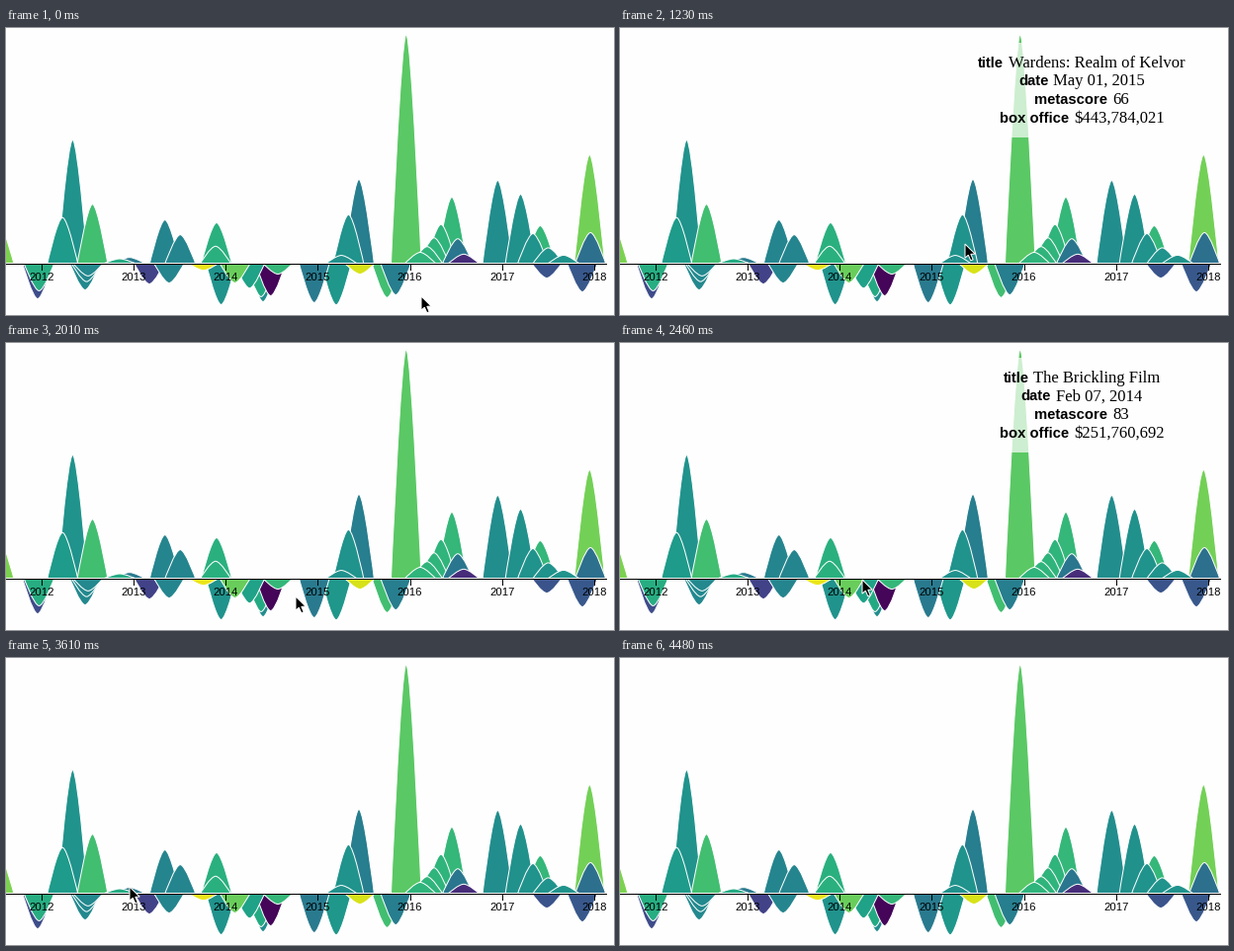
A matplotlib script for the animation above (5910 ms loop, 615x291 px).

```python
import numpy as np
import matplotlib.pyplot as plt
from matplotlib.animation import FuncAnimation
from matplotlib.patches import PathPatch, Polygon, Rectangle
from matplotlib.path import Path

W, H, DPI = 615, 291, 100
TICK, LOOP = 30, 5910
PX = 72 / DPI
BASE = 238.5
YEAR, YEAR_X = 93.1, 36.1          # pixels per year, x of 2012
HALF = YEAR * 60 / 365             # every peak spans 60 days each way
PAR, PX_PER_M = 307, .36           # takings on the axis line, pixels per million
MID, TOP, LEAD = 467, 15, 18.7
MONTHS = "Jan Feb Mar Apr May Jun Jul Aug Sep Oct Nov Dec".split()

# title, date, score, takings: these drive both peaks and tooltips
FILMS = [
    ("The Tall Lantern Affair:\nNorthern Protocol", "Dec 21, 2011", 73, 229_397_903),
    ("The Amber Gauntlet", "Mar 23, 2012", 68, 435_570_888),
    ("The Umbral Sentry", "Jul 20, 2012", 78, 473_139_099),
    ("Galaxy Reach: Into Shadow", "May 03, 2013", 62, 429_013_994),
    ("Unbearable Us 2", "Jul 03, 2013", 62, 387_266_004),
    ("Weightless", "Oct 04, 2013", 96, 287_092_705),
    ("The Marshfolk Saga", "Dec 13, 2013", 66, 190_366_855),
    ("The Brickling Film", "Feb 07, 2014", 83, 251_760_692),
    ("Commodore Meridia: The\nSummer Courier", "Apr 04, 2014", 70, 236_733_225),
    ("Mechanoids: Epoch of Ruin", "Jun 27, 2014", 33, 215_439_076),
    ("The Tarnholt: March of the\nNine Banners", "Dec 17, 2014", 59, 196_119_788),
    ("Thornabell", "Mar 13, 2015", 67, 189_594_626),
    ("Torque Republic", "Apr 03, 2015", 65, 329_007_020),
    ("Wardens: Realm of Kelvor", "May 01, 2015", 66, 443_784_021),
    ("Primal Valley", "Jun 12, 2015", 60, 543_270_625),
    ("Red Dust Alone", "Oct 02, 2015", 78, 210_433_663),
    ("Nightglass", "Nov 06, 2015", 60, 218_074_175),
]

# further landmark peaks: x, height, score
PEAKS = [
    (-7.5, 40, 85), (32, -36, 47), (67.4, 125, 66), (145, -21, 45), (165, -20, 62),
    (275, -11, 76), (358, -11, 94), (404.8, 232, 81), (497.4, 84, 64), (520.5, 70, 65),
    (540.4, 38, 76), (547, -15, 49), (583, -29, 50), (590.3, 110, 84), (591.2, 31, 56),
]

# pointer waypoints: ms, x, y
TRAIL = np.array([
    (320, 420, 272), (880, 383, 250), (1235, 349, 219), (1500, 337, 246),
    (1752, 325, 255), (2010, 293, 257), (2460, 245, 240), (2820, 207, 253),
    (2990, 181, 228), (3260, 162, 231), (3520, 140, 232), (4030, 49, 231),
    (4210, 25, 249),
])
# the pointer moves in bursts: first ms, last ms, steps
BURSTS = [(360, 880, 7), (970, 1500, 7), (1580, 2010, 6), (2280, 2820, 7),
          (2900, 3260, 5), (3520, 4030, 7), (4120, 4210, 2)]
GONE = 4480
STEPS = np.concatenate([[0]] + [np.linspace(*b) for b in BURSTS] + [[GONE]])

ARROW = np.array([(0, 0), (0, 14.2), (3.3, 11.2), (5.8, 16.8), (8.2, 15.7),
                  (5.8, 10.3), (10.2, 10.1)])

fig = plt.figure(figsize=(W / DPI, H / DPI), dpi=DPI, facecolor="#fefefe")
ax = fig.add_axes([0, 0, 1, 1])
ax.set_xlim(0, W)
ax.set_ylim(H, 0)
ax.axis("off")
viridis = plt.get_cmap("viridis")


def peak(x, h, score):
    """A smooth peak coloured by score; small ones lie in front."""
    y, lean = BASE - h, HALF / 3
    left, right = (x - HALF, BASE), (x + HALF, BASE)
    pts = [left, left, (x - lean, y), (x, y), (x + lean, y), right, right, left]
    codes = [Path.MOVETO] + [Path.CURVE4] * 6 + [Path.CLOSEPOLY]
    return ax.add_patch(PathPatch(Path(pts, codes), fc=viridis((score - 32) / 66),
                                  ec="white", lw=PX, zorder=2 - abs(h) / 1000))


def ladder(n, x, dx, h, ratio, score, change=0):
    """A row of peaks whose heights grow or shrink by a ratio."""
    for k in range(n):
        peak(x + k * dx, h * ratio ** k, score + k * change)


def date_x(date):
    month, day, year = date.replace(",", "").split()
    part = (MONTHS.index(month) + (int(day) - 1) / 30.4) / 12
    return YEAR_X + YEAR * (int(year) - 2012 + part)


def write(x, y, s, px, family, **kw):
    return ax.text(x, y, s, fontsize=px * PX, family=family, color="black", **kw)


def tip_line(y, label, value):
    """Bold label and serif value, centred together."""
    parts = [write(0, y, value, 16.6, "Liberation Serif", zorder=6)]
    if label:
        parts.insert(0, write(0, y, label, 14.7, "Liberation Sans", weight="bold", zorder=6))
    widths = [p.get_window_extent().width for p in parts]
    gap = 5
    x = MID - (sum(widths) + gap * (len(parts) - 1)) / 2
    for part, width in zip(parts, widths):
        part.set_x(x)
        part.set_visible(False)
        x += width + gap
    return parts


def add_film(title, date, score, takings):
    """Peak, tooltip texts and tooltip height of one film."""
    first, *rest = title.split("\n")
    rows = [("title", first)] + [("", r) for r in rest]
    rows += [("date", date), ("metascore", str(score)), ("box office", f"\\${takings:,}")]
    texts = []
    for i, (label, value) in enumerate(rows):
        texts += tip_line(TOP + 24.7 + i * LEAD, label, value)
    shape = peak(date_x(date), (takings / 1e6 - PAR) * PX_PER_M, score)
    return shape, texts, 20.9 + LEAD * len(rows)


def draw_axis():
    ax.plot([0, 607], [BASE, BASE], color="black", lw=PX, zorder=3)
    for i in range(7):
        x = YEAR_X + YEAR * i
        ax.plot([x, x], [BASE, BASE + 6], color="black", lw=PX, zorder=3)
        write(x, 256, str(2012 + i), 11.2, "Liberation Sans", ha="center", zorder=4)


films = [add_film(*f) for f in FILMS]
for p in PEAKS:
    peak(*p)
ladder(3, 80, 1.5, -27, .69, 63)
ladder(2, 115, 10, 4.5, 1.3, 72, -13)
ladder(2, 213, -1, 41, .42, 74)
ladder(2, 260, -2, -39, .87, 64, 8)
ladder(4, 419, 7, 11, 1.53, 75)
ladder(3, 451, 6, 67, .37, 76, -18)
ladder(3, 533, 15.5, 30, .52, 66)
draw_axis()

panel = ax.add_patch(Rectangle((350, TOP), 234, 0, fc="white", alpha=.7, lw=0, zorder=5))
pointer = ax.add_patch(Polygon(ARROW, fc="black", ec="white", lw=PX, zorder=8))


def film_at(spot):
    """The front film under the pointer, if any."""
    hits = [f for f in films if f[0].get_path().contains_point(spot)]
    return max(hits, key=lambda f: f[0].get_zorder(), default=None)


def update(i):
    ms = i * TICK + TICK - 1
    now = STEPS[STEPS <= ms][-1]
    spot = np.round([np.interp(now, TRAIL[:, 0], TRAIL[:, k]) for k in (1, 2)])
    shown = film_at(spot) if now < GONE else None
    for film in films:
        for text in film[1]:
            text.set_visible(film is shown)
    panel.set_visible(shown is not None)
    if shown:
        panel.set_height(shown[2])
    pointer.set_xy(ARROW + spot)
    pointer.set_visible(now < GONE)
    return []


anim = FuncAnimation(fig, update, frames=LOOP // TICK, interval=TICK,
                     init_func=lambda: update(0), repeat=True, repeat_delay=0)
plt.show()
```
